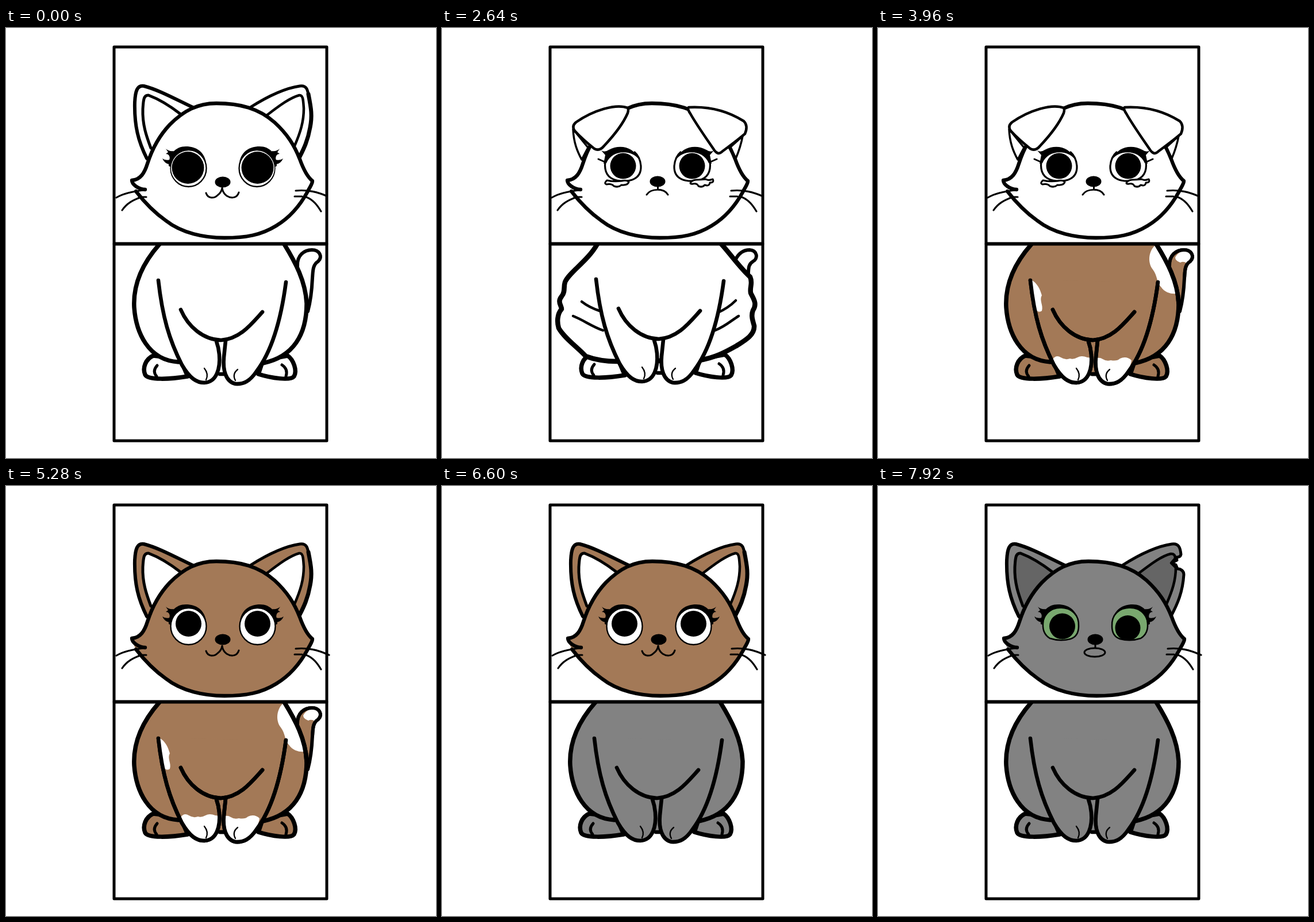
An HTML page that plays this animation: 748x748 px, repeating every 8000 ms.

```html
<!DOCTYPE html>
<html lang="en">
<head>
<meta charset="utf-8">
<title>Mix and match cat</title>
<style>
html, body { margin: 0; width: 100%; height: 100%; overflow: hidden; background: #fff; }
svg { display: block; width: 100vw; height: 100vh; }
.art { stroke: #000; stroke-linecap: round; stroke-linejoin: round; fill: none; }
.fur { fill: currentColor; }
.white { fill: #fff; stroke: none; }
.ink { fill: #000; stroke: none; }
.eye { fill: var(--iris, #fff); }
.inner { fill: var(--inner, #fff); }
.plain { color: #fff; }
.brown { color: #a37957; }
.gray { color: #828282; }

/* one step of the loop is 660 ms, or 8.25 % */
.top, .bottom, .card { animation: 8s step-end infinite; }
.top { animation-name: pull-top; }
.bottom { animation-name: pull-bottom; }
.t1 { animation-name: t1; } .t2 { animation-name: t2; }
.t3 { animation-name: t3; } .t4 { animation-name: t4; }
.b1 { animation-name: b1; } .b2 { animation-name: b2; }
.b3 { animation-name: b3; } .b4 { animation-name: b4; }
@keyframes pull-top {
  0%, 33%, 66%, 99%, 100% { transform: none; }
  24.75%, 57.75%, 90.75% { transform: translate(-36px, -31px); }
}
@keyframes pull-bottom {
  0%, 16.5%, 49.5%, 82.5%, 100% { transform: none; }
  8.25%, 41.25%, 74.25% { transform: translate(38px, 25px); }
}
@keyframes t1 { 0% { opacity: 1; } 33%, 100% { opacity: 0; } }
@keyframes t2 { 0%, 66%, 100% { opacity: 0; } 33% { opacity: 1; } }
@keyframes t3 { 0%, 99%, 100% { opacity: 0; } 66% { opacity: 1; } }
@keyframes t4 { 0% { opacity: 0; } 99%, 100% { opacity: 1; } }
@keyframes b1 { 0% { opacity: 1; } 16.5%, 100% { opacity: 0; } }
@keyframes b2 { 0%, 49.5%, 100% { opacity: 0; } 16.5% { opacity: 1; } }
@keyframes b3 { 0%, 82.5%, 100% { opacity: 0; } 49.5% { opacity: 1; } }
@keyframes b4 { 0% { opacity: 0; } 82.5%, 100% { opacity: 1; } }
</style>
</head>
<body>
<svg viewBox="0 0 748 748">
<defs>
  <clipPath id="top-box"><path d="M186 31H560V377H186z"/></clipPath>
  <clipPath id="bottom-box"><path d="M186 374H560V720H186z"/></clipPath>

  <g id="head">
    <path class="fur" stroke="none" d="M366 131C333 131 309 144 285 168C266 188 254 211 246 236C241 252 234 264 219 265C217 270 224 278 226 284C240 302 258 321 278 335C306 357 345 365 380 365C418 365 444 360 470 344C495 329 512 308 525 284C530 275 535 270 533 265C523 258 516 242 511 228C502 205 490 185 467 164C440 140 407 131 366 131z"/>
    <path stroke-width="6.3" d="M242 281C231 281 219 272 219 265C234 264 241 252 246 236C254 211 266 188 285 168C309 144 333 131 366 131C407 131 440 140 467 164C490 185 502 205 511 228C516 242 523 258 533 266C533 272 528 277 525 284C512 308 495 329 470 344C444 360 418 365 380 365C345 365 306 357 278 335C258 321 240 302 226 284"/>
    <path stroke-width="3.1" d="M192 295Q209 285 242 282M231 294H244M202 317C210 305 221 299 236 294M504 283C525 281 542 285 562 294M502 293H515M522 294C535 299 542 309 548 319"/>
  </g>
  <ellipse id="nose" class="ink" cx="377" cy="268" rx="13.5" ry="9.5"/>
  <path id="smile" stroke-width="3" d="M348 287C351 297 362 297 368 291Q375 286 376 278Q377 287 384 292C392 297 402 296 405 286"/>

  <g id="left-ear">
    <path class="fur" stroke-width="6" d="M327 139C297 125 267 108 240 101C228 99 225 110 224 129C223 170 230 197 245 227"/>
    <path class="inner" stroke-width="5" d="M304 150C286 136 264 123 248 117C239 116 239 127 238 141C237 169 245 190 252 209"/>
  </g>
  <g id="right-ear">
    <path class="fur" stroke-width="5" d="M425 138C455 119 483 105 511 101C526 99 525 112 528 127C532 145 533 153 529 173C525 196 518 210 510 226"/>
    <path class="inner" stroke-width="4.5" d="M452 153C472 138 492 122 510 117C517 116 517 126 518 140C518 163 512 182 502 205"/>
    <path stroke-width="7" d="M526 115C531 140 533 153 529 173C525 196 518 210 511 224"/>
  </g>
  <g id="torn-ear">
    <path class="fur" stroke-width="5" d="M425 138C455 119 483 105 511 101C524 99 526 109 527 119Q526 124 519 124L520 129L510 134L518 137L521 144C527 144 532 148 532 154C530 185 521 205 510 226"/>
    <path class="inner" stroke-width="4.5" d="M452 153C472 138 492 122 509 118Q517 117 517 126L510 134L518 142C518 164 512 182 502 205"/>
  </g>
  <g id="folded-ears" class="fur">
    <path stroke-width="3.5" d="M228 176C229 199 235 214 243 229L254 208zM523 188C520 204 517 213 511 227L502 207z"/>
    <path stroke-width="4.5" d="M323 139C303 131 263 143 233 164Q225 171 231 179C242 191 255 202 265 210Q274 215 282 205C298 188 314 169 323 148Q325 142 323 139z"/>
    <path stroke-width="4.5" d="M429 138C465 136 498 145 525 162Q533 170 527 184C512 197 499 206 486 216Q480 221 474 213C459 191 442 167 432 149Q426 140 429 138z"/>
  </g>

  <g id="lid" class="ink">
    <path d="M283 240C283 219 295 206 313 206C331 206 344 215 348 233C340 217 330 213 317 213C301 213 289 224 287 242z"/>
    <path d="M278 210Q283 215 292 214L285 228Q285 219 278 219L282 216zM272 227Q277 231 286 229L284 237Q276 236 272 227z"/>
  </g>
  <g id="open-eye">
    <ellipse class="eye" cx="317.5" cy="244" rx="31" ry="32" stroke-width="2.3"/>
    <use href="#lid"/>
  </g>
  <g id="big-eye">
    <use href="#open-eye"/>
    <circle class="white" cx="317" cy="244" r="30"/>
    <circle class="ink" cx="316.500" cy="243" r="28"/>
  </g>
  <g id="wide-eye"><use href="#open-eye"/><circle class="ink" cx="317.500" cy="239.500" r="22.500"/></g>
  <g id="green-eye">
    <path class="eye" stroke-width="2.5" d="M287 240C288 219 301 211 318 211C339 211 350 226 349 244C349 256 344 263 335 266Q317 271 299 265Q286 257 287 240z"/>
    <use href="#lid"/>
  </g>
  <g id="sad-eye">
    <path class="white" d="M284 240C283 198 346 198 346 242C345 263 331 268 304 265Q287 262 284 240z"/>
    <path stroke-width="3.2" d="M284 232C282 248 286 261 304 265C327 269 347 263 346 240C345 229 341 221 335 216"/>
    <path class="ink" d="M277 213Q283 217 290 212C309 202 333 206 343 229C330 211 296 211 286 235L281 236L284 221z"/>
    <path stroke-width="3" d="M272 228L281 232"/>
  </g>

  <g id="tail"><path class="fur" stroke-width="6" d="M507 414C506 395 519 386 532 386C546 386 551 398 543 406C533 412 534 424 533 435C532 458 529 478 525 493"/></g>
  <g id="feet" class="fur" stroke-width="7.5">
    <path d="M256 570C243 576 237 591 242 603C247 613 286 611 316 606L303 575z"/>
    <path d="M490 570C500 577 507 596 501 606C495 614 461 609 439 602L447 578z"/>
    <path stroke-width="5" d="M263 587Q254 597 262 606M480 586Q491 593 487 606"/>
  </g>
  <g id="torso">
    <path class="fur" stroke="none" d="M267 376C236 411 221 449 223 486C226 529 247 578 300 581L370 603H379L447 583C500 572 523 533 523 479C521 440 503 407 484 376z"/>
    <path stroke-width="7.5" d="M267 376C236 411 221 449 223 486C226 529 247 578 300 581M484 376C503 407 521 440 523 479C523 533 500 572 447 583"/>
  </g>
  <g id="arms">
    <path class="fur" stroke="none" d="M265 438C272 500 287 549 306 586C324 620 353 629 368 598Q375 570 366 543H382C376 570 378 598 387 612C402 625 427 619 436 600C466 560 478 505 487 442z"/>
  </g>
  <g id="arm-lines">
    <path stroke-width="6.6" d="M265 439C272 502 284 543 306 586C320 610 332 617 345 617C367 616 373 591 371 568Q370 556 366 545M487 442C479 503 464 560 436 597C424 615 413 620 399 619C382 615 377 595 379 573L382 544M304 490C317 520 343 542 374 543C407 541 427 515 446 494M372 602H379"/>
    <path stroke-width="2.3" d="M345 592Q353 602 348 612M403 594Q393 602 399 613"/>
  </g>
  <g id="bare-body">
    <use href="#feet"/><use href="#torso"/><use href="#arms"/><use href="#arm-lines"/>
  </g>
  <g id="patches" class="white">
    <path d="M264 437C279 443 283 459 285 465C280 474 288 482 285 492C277 497 275 489 272 485z"/>
    <path d="M482 378C470 389 469 409 478 420C486 430 485 444 492 450C499 461 512 463 518 462C521 432 500 400 482 378z"/>
    <path d="M304 576Q310 568 318 573T334 575Q340 577 347 573T364 573L371 574C373 592 364 616 345 617C324 617 312 597 304 576z"/>
    <path d="M379 575Q385 572 391 576T405 578Q416 580 421 575Q432 570 441 578C438 600 420 619 401 619C382 619 377 595 379 575z"/>
    <path d="M517 399C523 388 536 384 545 392C549 400 544 405 537 409Q531 405 526 408Q517 405 517 399z"/>
  </g>

  <path id="top-frame" stroke-width="5" d="M188 33H558V375H188z"/>
  <path id="bottom-frame" stroke-width="5" d="M188 376H558V718H188z"/>
</defs>

<g class="art">
  <g class="bottom">
    <g class="card b1 plain" clip-path="url(#bottom-box)">
      <use href="#tail"/><use href="#bare-body"/>
    </g>
    <g class="card b2 plain" clip-path="url(#bottom-box)">
      <path stroke-width="6" d="M511 402C518 389 527 386 535 386C549 387 550 401 541 406C531 412 534 421 532 438"/>
      <use href="#feet" x="2" y="-2"/>
      <path class="fur" stroke-width="8.5" d="M270 376C254 405 221 425 214 442C211 451 215 459 208 467C200 477 208 482 208 489C200 498 200 512 203 522C213 540 238 557 250 571Q274 580 305 580L447 578C475 574 496 562 512 553C530 542 544 533 543 518C541 510 537 501 541 491C549 479 541 470 537 461C535 450 541 444 536 433C519 418 504 396 486 376"/>
      <use href="#arms" x="3" y="-2"/><use href="#arm-lines" x="3" y="-2"/>
      <path stroke-width="4.5" d="M243 476Q256 486 274 492M228 501C246 508 260 519 280 526M511 474Q498 487 480 495M516 501C503 509 493 519 475 526"/>
    </g>
    <g class="card b3 brown" clip-path="url(#bottom-box)">
      <use href="#tail"/><use href="#bare-body"/>
      <use href="#patches"/>
      <use href="#arm-lines"/>
      <path stroke-width="7.5" d="M484 376C503 407 521 440 523 479"/>
      <path stroke-width="6" d="M507 414C506 395 519 386 532 386C546 386 551 398 543 406C533 412 534 424 533 435"/>
    </g>
    <g class="card b4 gray" clip-path="url(#bottom-box)"><use href="#bare-body"/></g>
    <use href="#bottom-frame"/>
  </g>

  <g class="top">
    <g class="card t1 plain" clip-path="url(#top-box)">
      <use href="#left-ear"/><use href="#right-ear"/><use href="#head"/>
      <use href="#big-eye"/><use href="#big-eye" transform="translate(754) scale(-1 1)"/>
      <use href="#nose"/><use href="#smile"/>
    </g>
    <g class="card t2 plain" clip-path="url(#top-box)">
      <use href="#head" x="-1"/>
      <use href="#sad-eye"/><use href="#sad-eye" transform="translate(750) scale(-1 1)"/>
      <circle class="ink" cx="315" cy="240" r="22.500"/>
      <circle class="ink" cx="435" cy="240" r="22.500"/>
      <use href="#folded-ears"/>
      <path class="white" style="stroke:#000" stroke-width="3" d="M287 265Q281 270 286 272Q295 270 299 275Q307 278 312 273Q323 274 325 268Q322 264 313 266Q299 268 287 265zM433 268Q430 272 437 271Q444 270 446 275Q453 278 457 273Q465 276 466 269Q474 269 471 263Q463 266 459 263Q450 264 443 264Q437 264 433 268z"/>
      <use href="#nose" x="-2" y="-1"/>
      <path stroke-width="3" d="M375.500 276V281M356 290C363 279 386 278 393 290"/>
    </g>
    <g class="card t3 brown">
      <use href="#left-ear"/><use href="#right-ear"/><use href="#head"/>
      <use href="#wide-eye"/><use href="#wide-eye" transform="translate(755) scale(-1 1)"/>
      <use href="#nose" y="-1"/><use href="#smile"/>
    </g>
    <g class="card t4 gray" style="--iris:#79a86f;--inner:#656565">
      <use href="#left-ear"/><use href="#torn-ear"/><use href="#head"/>
      <use href="#green-eye"/><use href="#green-eye" transform="translate(756) scale(-1 1)"/>
      <circle class="ink" cx="320.500" cy="244" r="22.500"/>
      <circle class="ink" cx="434.500" cy="247" r="22"/>
      <use href="#nose" x="1" y="-1"/>
      <path stroke-width="3" d="M378 276V281"/>
      <ellipse cx="377" cy="289.500" rx="18" ry="7.500" stroke-width="3"/>
    </g>
    <use href="#top-frame"/>
  </g>
</g>
</svg>
</body>
</html>
```
